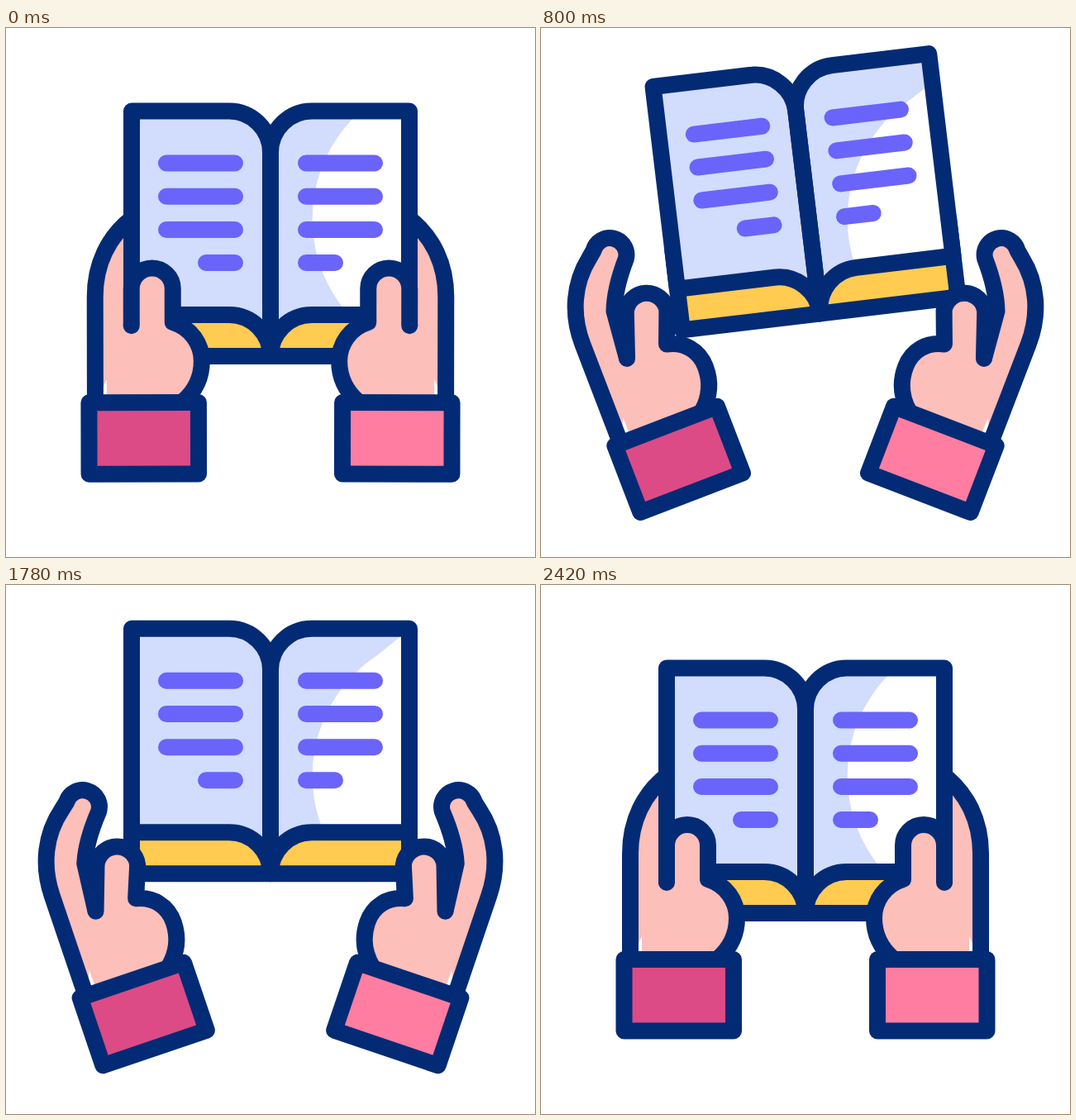
An HTML page for the animation above (2620 ms loop, 640x640 px).

```html
<!DOCTYPE html>
<html lang="en">
<head>
<meta charset="utf-8">
<title>Reading</title>
<style>
@property --lift { syntax: "<number>"; inherits: true; initial-value: 0; }
@property --tilt { syntax: "<number>"; inherits: true; initial-value: 0; }
@property --open { syntax: "<number>"; inherits: true; initial-value: 0; }

html, body { margin: 0; width: 100%; height: 100%; overflow: hidden; background: #fff; }

svg {
  --loop: 2620ms cubic-bezier(.333, 0, .667, 1) infinite;
  display: block; width: 100%; height: 100%;
  fill: none; stroke: #032b75; stroke-width: 20;
  stroke-linecap: round; stroke-linejoin: round;
  animation: lift var(--loop), tilt var(--loop), open var(--loop);
}

.book, .fixed { transform-origin: 320px 248.5px; }
.book { transform: translateY(calc(var(--lift) * -1px)) rotate(calc(var(--tilt) * 1deg)); }
.fixed { transform: rotate(calc(var(--tilt) * -1deg)) translateY(calc(var(--lift) * 1px)); }
.hand { transform-origin: 235.8px 509.3px; transform: rotate(calc(var(--open) * -1deg)); }

.page { d: path("M152 100.5H270A50 50 0 0 1 320 150.5V397A50 50 0 0 0 270 347H152Z"); }
.bars { d: path("M194 163.5H277M194 203.7H277M194 244H277M242 284H277"); stroke: #6a64fa; }
.blue { fill: #d2dcfd; stroke: none; }
.white { fill: #fff; stroke: none; }
.cover { fill: #ffcb50; }

.finger, .palm, .thumb { fill: #fdbfb9; }
.finger { d: path("M108 455V325C108 286 124 252 153 230L161 223.5A20 20 0 0 1 194 247Q168 276 158 301L152 360"); }
.palm { d: path("M122 362H160L216 455H122Z"); stroke: none; }
.thumb {
  d: path("M152 360L152 315A25 25 0 0 1 202 315L202 356C224 363 237 382 237 403C237 424 228 440 214 452");
  animation: thumb var(--loop);
}
.cuff { fill: var(--cuff); }
.left { --cuff: #dc4b85; }
.right { --cuff: #ff7da0; }

@keyframes lift {
  0% { --lift: 0; animation-timing-function: cubic-bezier(.28, 0, .67, 1); }
  27.48%, 64.12% { --lift: 50.5; }
  91.6%, 100% { --lift: 0; }
}
@keyframes tilt {
  0%, 18.32% { --tilt: 0; }
  27.48% { --tilt: -7.8; }
  45.42% { --tilt: 4.4; }
  54.96%, 100% { --tilt: 0; }
}
@keyframes open {
  0% { --open: 0; animation-timing-function: cubic-bezier(.1, .3, .5, 1); }
  27.48% { --open: 21; }
  64.12% { --open: 21; animation-timing-function: cubic-bezier(.167, 0, .667, 1); }
  91.6%, 100% { --open: 0; }
}
@keyframes thumb {
  0% { animation-timing-function: cubic-bezier(.2, .3, .6, 1); }
  27.48%, 71.76% {
    d: path("M152 360L171 307A25 25 0 0 1 218 323L203 361C224 366 237 382 237 403C237 424 228 440 214 452");
  }
  91.6%, 100% {
    d: path("M152 360L152 315A25 25 0 0 1 202 315L202 356C224 363 237 382 237 403C237 424 228 440 214 452");
  }
}
</style>
</head>
<body>
<svg viewBox="0 0 640 640">
  <clipPath id="rightPage">
    <path class="page" transform="matrix(-1 0 0 1 640 0)"/>
  </clipPath>

  <g class="left"><g class="hand"><path class="finger"/></g></g>
  <g class="right" transform="matrix(-1 0 0 1 640 0)"><g class="hand"><path class="finger"/></g></g>

  <g class="book">
    <path class="cover" d="M152 300H488V397H152Z"/>
    <path class="page blue"/>
    <path class="page white" transform="matrix(-1 0 0 1 640 0)"/>
    <g clip-path="url(#rightPage)">
      <!-- the shade stays still while the page moves through it -->
      <path class="fixed blue" d="M500 44L449 85A175 175 0 0 0 405 335L420 352V420H300V20H500Z"/>
    </g>
    <path class="page"/>
    <path class="bars"/>
    <g transform="matrix(-1 0 0 1 640 0)">
      <path class="page"/>
      <path class="bars"/>
    </g>
  </g>

  <g class="left">
    <g class="hand">
      <path class="palm"/>
      <path class="thumb"/>
      <rect class="cuff" x="100.5" y="453" width="132.5" height="86.5"/>
    </g>
  </g>
  <g class="right" transform="matrix(-1 0 0 1 640 0)">
    <g class="hand">
      <path class="palm"/>
      <path class="thumb"/>
      <rect class="cuff" x="100.5" y="453" width="132.5" height="86.5"/>
    </g>
  </g>
</svg>
</body>
</html>
```
